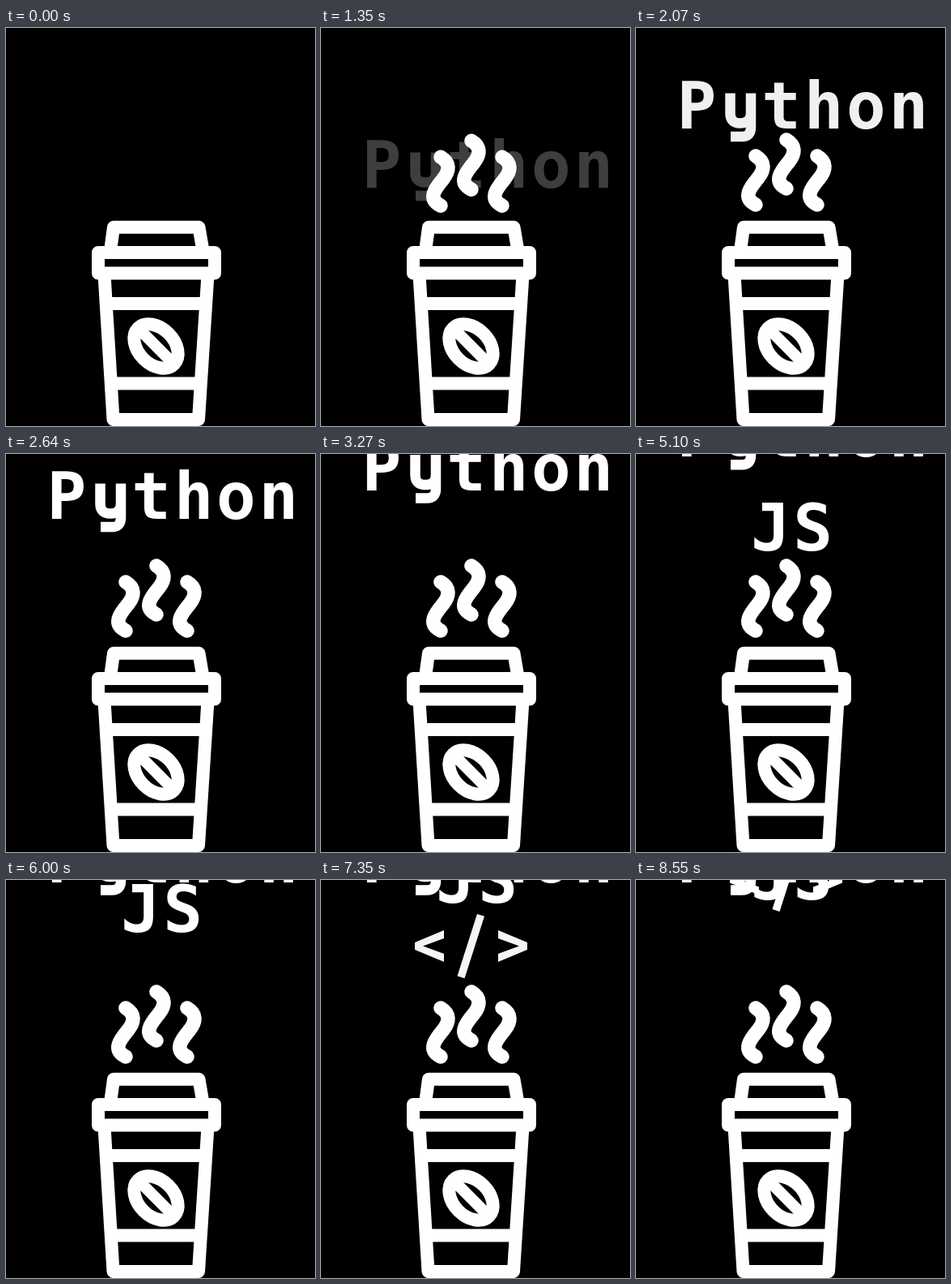
Recreate the animation shown at these times as an HTML page. Size 382 by 491 pixels, loop 8580 ms.

```html
<!DOCTYPE html>
<html lang="en">
<head>
<meta charset="utf-8">
<title>Coffee and code</title>
<style>
  html, body { margin: 0; width: 100%; height: 100%; overflow: hidden; background: #000; }
  svg { display: block; width: 100vw; height: 100vh; }
  .line { fill: none; stroke: #fff; stroke-width: 16; stroke-linecap: round; stroke-linejoin: round; }
  #steam { stroke-width: 17.5; }
  .line .crease { stroke-width: 14; }
  text {
    font: bold 81px "DejaVu Sans Mono", monospace;
    letter-spacing: 3.6px;
    fill: #fff;
  }
  .bare { fill: none; }
  .hook { fill: none; stroke: #fff; stroke-width: 12.5; }
</style>
</head>
<body>
<svg viewBox="0 0 382 491">
  <defs>
    <path id="wisp" d="M0 0C12 7 11 17 3 27C-7 39 -17 51 0 60"/>
  </defs>

  <g id="steam" class="line" opacity="0">
    <use href="#wisp" x="148" y="158"/>
    <use href="#wisp" x="186" y="138"/>
    <use href="#wisp" x="224" y="158"/>
  </g>

  <!-- the y has a squared bowl and a flat tail -->
  <g id="python" opacity="0">
    <text x="50.6" y="2.5">P<tspan class="bare">y</tspan>thon</text>
    <path class="hook" d="M116.5 -41V-16Q116.5 -4 129 -4T142 -16M142 -41V1Q142 12.5 131 12.5H117"/>
  </g>
  <text id="js" x="142" y="23.9" opacity="0">JS</text>
  <g id="tag" fill="#fff" opacity="0">
    <path d="M152 -51L116 -36V-27L152 -12V-22L126 -31.5L152 -41Z"/>
    <path d="M219 -51L255 -36V-27L219 -12V-22L245 -31.5L219 -41Z"/>
    <path d="M197.5 -69.5L173 7" stroke="#fff" stroke-width="9.5"/>
  </g>

  <g class="line">
    <path d="M129 275L133 245.8H238.5L243.5 275"/>
    <rect x="114" y="277" width="144" height="25.5"/>
    <path d="M121.5 304L132.5 483H238L249.5 304M126 340H246M132 438.5H240"/>
    <g transform="translate(185.5 392.5) rotate(45)">
      <ellipse rx="31.5" ry="22"/>
      <path class="crease" d="M-25 0H25"/>
    </g>
  </g>
</svg>
<script>
  const LOOP = 8580;
  const risers = [
    { id: "steam", start: 240, time: 1346, dist: 94, fade: 600 },
    { id: "python", start: 1100, time: 4443, dist: 225, fade: 1030 },
    { id: "js", start: 3740, time: 4445, dist: 236, fade: 600 },
    { id: "tag", start: 6381, time: 3916, dist: 230, fade: 1010 }
  ];
  for (const r of risers) r.el = document.getElementById(r.id);

  const clamp = v => Math.min(1, Math.max(0, v));

  function draw(t) {
    for (const { el, start, time, dist, fade } of risers) {
      const left = 1 - clamp((t - start) / time);
      el.setAttribute("transform", `translate(0 ${(dist * left ** 2.5).toFixed(2)})`);
      el.setAttribute("opacity", clamp((t - start) / fade).toFixed(3));
    }
  }

  const begin = performance.now();
  function tick() {
    draw((performance.now() - begin) % LOOP);
    requestAnimationFrame(tick);
  }
  tick();
</script>
</body>
</html>
```
